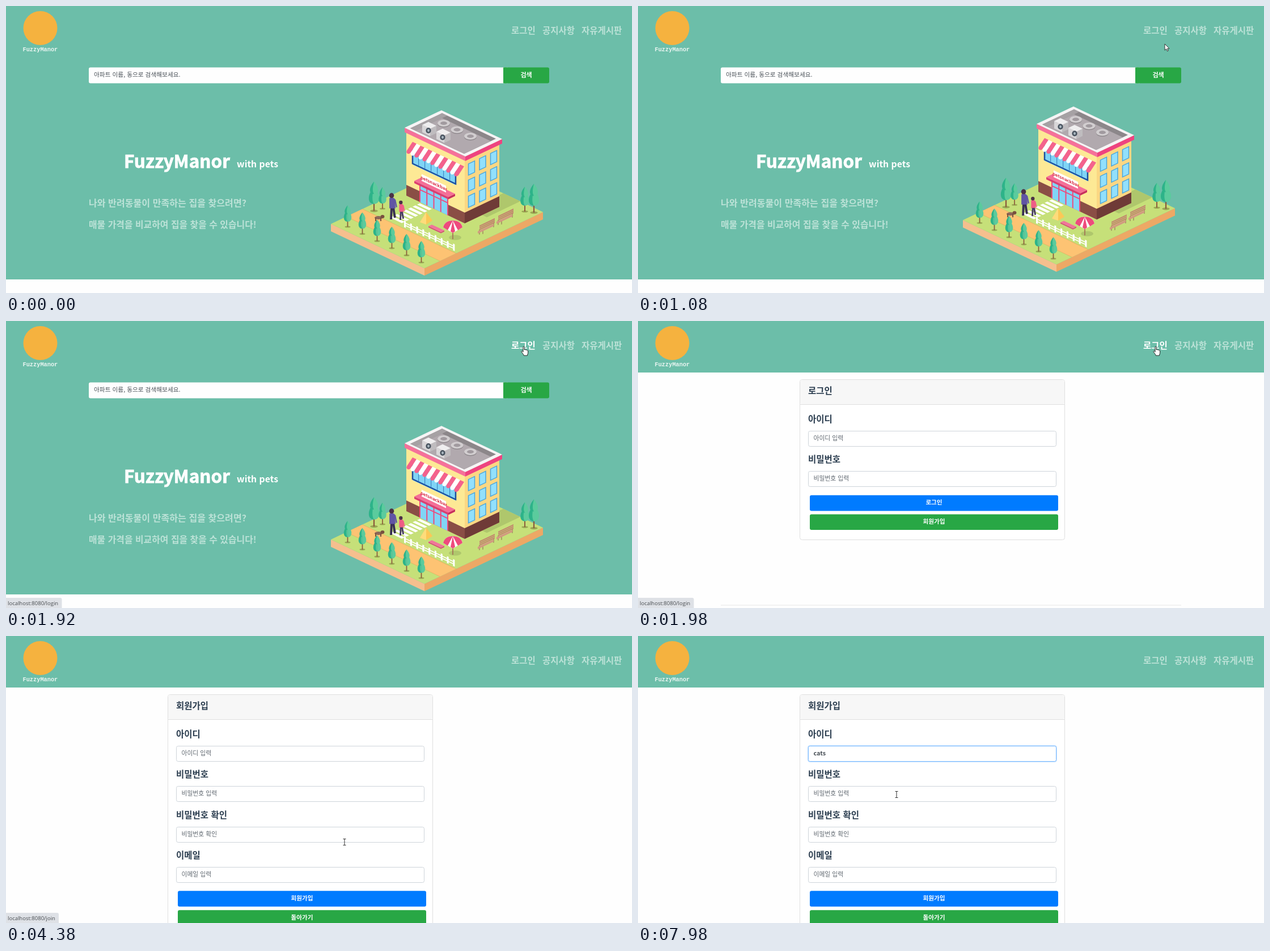
An HTML page for the animation above (8 s loop, 1104 by 507 pixels).

```html
<!DOCTYPE html>
<html lang="ko">
<head>
<meta charset="utf-8">
<title>FuzzyManor</title>
<style>
html, body { margin: 0; width: 100%; height: 100%; overflow: hidden; background: #fefefe; }
svg { display: block; width: 1104px; height: 507px; }
text { font-family: "Noto Sans CJK KR", "Noto Sans CJK", sans-serif; white-space: pre; }
.mono { font-family: "Liberation Mono", monospace; }
.ui { font-family: "Open Sans", sans-serif; }
</style>
</head>
<body>
<svg id="stage" viewBox="0 0 1104 507"></svg>
<script>
const LOOP = 8000, STEP = 60;
const GREEN = '#28a745', BLUE = '#007bff', TEAL = '#6cbea9', SOFT = '#bce2d7', INK = '#2c3e50';
const each = (n, fn) => [...Array(n).keys()].map(fn).join('');

const poly = (points, fill) => `<polygon points="${points.join(' ')}" fill="${fill}"/>`;
const box = (x, y, w, h, fill, extra = '') =>
  `<rect x="${x}" y="${y}" width="${w}" height="${h}" fill="${fill}" ${extra}/>`;
const oval = (x, y, rx, ry, fill, extra = '') =>
  `<ellipse cx="${x}" cy="${y}" rx="${rx}" ry="${ry}" fill="${fill}" ${extra}/>`;
const shape = (d, fill) => `<path d="${d}" fill="${fill}"/>`;
const path = (d, stroke, width, extra = '') =>
  `<path d="${d}" fill="none" stroke="${stroke}" stroke-width="${width}" ${extra}/>`;
const group = (move, body) => `<g transform="${move}">${body}</g>`;
// y is the vertical middle of the line
const label = (x, y, size, str, fill, extra = '') =>
  `<text x="${x}" y="${y + size * 0.37}" font-size="${size}" fill="${fill}" ${extra}>${str}</text>`;
const BOLD = 'font-weight="700"', MID = 'font-weight="500"';
const CENTER = 'text-anchor="middle" font-weight="700"';

/* ---------- isometric drawing ---------- */

const TILT = 25.4, SLOPE = Math.tan(TILT * Math.PI / 180);
// walls facing down-left and down-right
const left = (x, y, body) => group(`translate(${x} ${y}) skewY(${TILT})`, body);
const right = (x, y, body) => group(`translate(${x} ${y}) skewY(${-TILT})`, body);

// flat rectangle: a runs down-right, b runs up-right from the left corner
const floor = (x, y) => (a1, a2, b1, b2, fill) =>
  poly([[a1, b1], [a2, b1], [a2, b2], [a1, b2]].map(([a, b]) => [x + a + b, y + SLOPE * (a - b)]), fill);

const block = (x, y, w, d, h, [l, r, top]) =>
  left(x, y, box(0, 0, w, h, l)) +
  right(x + w, y + w * SLOPE, box(0, 0, d, h, r)) +
  (top ? floor(x, y)(0, w, 0, d, top) : '');

function tree(x, y, s) {
  const leaf = (top, low, w) => {
    const half = side => `M0 ${top}C${side * w} ${top + 8} ${side * w} ${low} 0 ${low}`;
    return shape(half(-1), '#2db389') + shape(half(1), '#5bcb9d') +
      shape(`M0 ${top}C${-w * .3} ${top + 9} ${-w * .3} ${low - 3} 0 ${low}`, '#5bcb9d');
  };
  return group(`translate(${x} ${y}) scale(${s})`,
    oval(0, 0, 5, 1.6, '#9aa653') + path('M0 0V-24', '#8b5a3c', 1.7) + leaf(-30, -9, 9) + leaf(-38, -22, 7));
}

const bench = (x, y) => right(x, y,
  path('M-12 2V11M-6 6V13M13 2V10', '#8d5f50', 1) +
  each(3, i => box(-12, -5 + i * 3, 27, 2.3, '#c2866d')) + box(-15, 4, 28, 4, '#d29a80'));

function land() {
  const tile = floor(573, 385);
  return block(573, 385, 165, 209, 13, ['#f5bf8e', '#eda865', '#c6e079']) +
    tile(0, 165, 27, 56, '#d7a75c') + tile(0, 165, 27.6, 55.4, '#fdc373') +
    tile(95, 125, 150, 209, '#afc76c') +
    each(7, i => tile(40, 61, 64 + i * 8, 69 + i * 8, '#fff'));
}

function house() {
  const panes = 'stroke="#4ba6dc" stroke-width="1.5"';
  const front = box(11, 30, 76, 28, '#7fd4f6') + path('M11 30V56H87V30', '#1d4f9e', 2.5) +
    each(6, i => box(21 + i * 11, 30, 1.2, 25, '#3f86c4')) +
    box(24, 84, 49, 34, '#80d5f7') +
    each(5, i => box(23 + i * 12.25, 84, 2, 34, '#ee4a7c')) + box(24, 95, 49, 2, '#ee4a7c');
  const side = each(9, i => box(6.5 + i % 3 * 19.5, 16 + Math.floor(i / 3) * 28.5, 11, 20, '#92e0fc', panes));
  return block(706, 217, 103, 61, 118, ['#fde995', '#fbd783']) +
    block(706, 316, 103, 61, 19, ['#8a4e45', '#6f3b37']) +
    left(706, 217, front) + right(809, 266, side);
}

function awning() {
  return group(`matrix(1 ${SLOPE} -.65 1 717 240)`, each(13, i => {
    const fill = i % 2 ? '#fff' : '#f4628d';
    return box(i * 7, 0, 7, 15, fill) + oval(i * 7 + 3.5, 15, 3.5, 4, fill);
  }));
}

const entrance = () => block(720, 309, 60, 12, 4, ['#dc3f70', '#c72f5f', '#f56f97']) +
  left(733, 297, box(0, 0, 43, 12, '#fff') + label(21.5, 6, 7.6, 'petsnackbar', '#d8273f', CENTER));

function roof() {
  const top = floor(703, 215);
  const vent = i => group(`translate(${772 + i * 23.5} ${207 + i * 11.5})`,
    oval(0, 1.5, 11, 6, '#8f898d') + oval(0, 0, 11, 6, '#d2ced0') + oval(0, 0, 6, 3, '#a19a9f'));
  const cooler = i => group(`translate(${734 + i * 25} ${210 + i * 12})`,
    block(0, 0, 14, 11, 13, ['#d8d6d8', '#bfbcbf', '#efeeef']) +
    oval(11, 10, 4.6, 5, '#4a5561') + oval(11, 10, 2, 2.4, '#a9b6bf'));
  return block(703, 215, 107, 65, 8, ['#f5719a', '#ee4380', '#f6f4f5']) +
    top(6, 101, 4, 60, '#8c878a') + top(6, 15, 4, 60, '#a6a1a4') + top(15, 101, 4, 51, '#b1a9ae') +
    each(3, vent) + each(2, cooler);
}

function person(x, y, s, shirt, legs) {
  return group(`translate(${x} ${y}) scale(${s})`,
    path('M-1-22L-2 0M2-22L5-3', legs, 4) + shape('M-5-38Q0-42 5-37L6-20H-5Z', shirt) +
    path('M5-36L8-22', shirt, 2.4) + oval(-1, -43, 4.4, 4.6, '#4b3146'));
}

function garden() {
  const fence = path('M0 4H88M0 8H88', '#fff', 1.8) + each(9, i => box(i * 10.8 - 1, 0, 3, 12, '#fff'));
  const dog = oval(657, 374, 7, 3, '#8d6658') + oval(664, 372, 3.4, 3, '#78503f') +
    path('M652 374V380M661 374V380', '#78503f', 2);
  const tent = poly([[730, 382], [741, 364], [752, 379], [741, 386]], '#fbc857') +
    poly([[730, 382], [741, 364], [741, 386]], '#fddc7b');
  const parasol = oval(792, 409, 11, 4.5, '#afc76c') + path('M788 390V412', '#a26b52', 1.6) +
    shape('M771 391Q774 379 788 379Q802 379 805 391L788 401Z', '#fff') +
    shape('M788 379Q774 379 771 391L779 396ZM788 379Q802 379 805 391L797 396ZM788 379L784 398L788 401L792 398Z', '#ee4b7d');
  return left(703, 379, fence) + person(681, 377, .98, '#6054a4', '#382f52') +
    person(697, 378, .72, '#ef5c86', '#463b61') + dog + tent +
    block(745, 389, 22, 6, 2, ['#d14c74', '#d14c74', '#f0759a']) + parasol + bench(847, 387) + bench(880, 370);
}

const scene = () => land() + tree(649, 362, 1.36) + tree(664, 358, 1) +
  house() + awning() + entrance() + roof() + garden() +
  tree(915, 363, 1.15) + tree(931, 365, 1.34) +
  each(6, i => tree(602.5 + i * 26, 390 + i * 12.6, 1));

/* ---------- pages ---------- */

function home() {
  return box(0, 0, 1104, 483, TEAL) +
    box(146, 108.5, 740, 28, '#fefefe', 'rx="3"') +
    label(155, 121.5, 10.7, '아파트 이름, 동으로 검색해보세요.', '#495057', MID) +
    box(877, 108.5, 81, 28, GREEN, 'rx="3"') + box(877, 108.5, 6, 28, GREEN) +
    label(917.5, 121.5, 11, '검색', '#fff', CENTER) +
    label(208, 274, 31.5, 'FuzzyManor', '#fff', `${BOLD} stroke="#fff" stroke-width=".8"`) +
    label(407, 279.5, 15.8, 'with pets', '#fff', BOLD) +
    label(146, 348, 16.1, '나와 반려동물이 만족하는 집을 찾으려면?', SOFT, BOLD) +
    label(146, 386.5, 15.9, '매물 가격을 비교하여 집을 찾을 수 있습니다!', SOFT, BOLD) +
    `<g id="scene">${scene()}</g>`;
}

const fieldTop = i => 194 + i * 71.4;
const field = (title, i) => {
  const y = Math.round(fieldTop(i)), hint = title.includes('확인') ? title : title + ' 입력';
  return label(300, y - 20.5, 15.5, title, INK, BOLD) +
    box(300.5, y + .5, 437, 27, '#fff', `rx="3" stroke="#ced4da" id="field${i}"`) +
    label(309.5, y + 13, 10.8, hint, '#5f676f', `${MID} class="hint"`);
};

const button = (y, str, fill, id = '') => box(303, y, 438, 27.7, fill, `rx="3" ${id}`) +
  label(522, y + 12.5, 10.6, str, '#fff', CENTER);

const card = (title, h, body) => box(0, 0, 1104, 91, TEAL) +
  box(285.5, 103.5, 467, h, '#fff', 'rx="4" stroke="#dfdfdf"') +
  box(286, 104, 466, 43, '#f7f7f7', 'rx="3"') + path('M286 147.5H752', '#dfdfdf', 1) +
  label(300, 123.5, 15.5, title, INK, BOLD) + body;

const login = () => path('M146 502H958', '#e6e6e6', 1) +
  card('로그인', 283, ['아이디', '비밀번호'].map(field).join('') +
    button(307.8, '로그인', BLUE) + button(341.4, '회원가입', GREEN, 'id="signup"'));

const join = () => card('회원가입', 460,
  box(299, 193, 440, 30, '#bfdeff', 'rx="4.5" id="glow"') +
  ['아이디', '비밀번호', '비밀번호 확인', '이메일'].map(field).join('') +
  label(309.5, 207, 10.8, '', '#495057', `${BOLD} id="typed"`) +
  box(309, 202, 1, 12, '#333', 'id="caret"') +
  button(450.3, '회원가입', BLUE) + button(484.2, '돌아가기', GREEN));

const header = () => '<circle cx="60.5" cy="39" r="30" fill="#f5b23f"/>' +
  label(29.5, 75.7, 10.3, 'FuzzyManor', '#e9f5f1', `${BOLD} class="mono"`) +
  label(891, 43.5, 15.5, '로그인', SOFT, `${BOLD} id="nav"`) +
  label(946, 43.5, 15.5, '공지사항', SOFT, BOLD) + label(1015, 43.5, 15.5, '자유게시판', SOFT, BOLD);

const status = () => '<g id="status"><rect id="bar" x="-4" y="489" height="24" rx="3" fill="#dee1e6"/>' +
  label(3, 498.5, 9.5, '', '#484c50', 'class="ui" id="url"') + '</g>';

const HAND = 'M-1 1.2C-1-.4 1.2-.4 1.2 1.2V6C1.4 4.9 3.2 5 3.4 6.3C3.8 5.3 5.4 5.6 5.6 6.9C6.2 6.2 7.6 6.6 7.6 8V11.5L6.4 16H.2C0 14-2.6 11.6-3.8 9.6C-4.5 8.3-2.8 7.4-1.8 8.6L-1 9.6Z';
const cursors = () => '<g id="cursor">' +
  '<path id="arrow" d="M0 0V11.2L2.6 8.8L4.4 12.8L6.2 12L4.5 8.2H8Z" fill="#fff" stroke="#222" stroke-width=".9"/>' +
  `<path id="hand" d="${HAND}" fill="#fff" stroke="#222"/>` +
  path('M-2.5-5.5H2.5M0-5.5V5.5M-2.5 5.5H2.5', '#333', 1, 'id="beam"') + '</g>';

document.getElementById('stage').innerHTML =
  `<g id="home">${home()}</g><g id="login">${login()}</g><g id="join">${join()}</g>` +
  header() + status() + cursors();

/* ---------- motion ---------- */

const $ = q => document.querySelector(q);
const show = (q, on) => $(q).setAttribute('visibility', on ? 'inherit' : 'hidden');
const set = (q, name, value) => $(q).setAttribute(name, value);
const part = (t, a, b) => Math.min(1, Math.max(0, (t - a) / (b - a)));

// pointer moves: start, end, where to, sideways bend
const MOVES = [
  { from: 360, to: 1080, x: 929, y: 67, bend: 0 },
  { from: 1140, to: 1500, x: 913, y: 45, bend: 0 },
  { from: 2400, to: 3060, x: 726, y: 364, bend: 30 },
  { from: 3240, to: 3750, x: 597, y: 364, bend: 22 },
  { from: 4620, to: 5580, x: 471, y: 217, bend: 10 },
  { from: 7200, to: 7740, x: 456, y: 288, bend: 0 },
  { from: 7800, to: 7980, x: 456, y: 280, bend: 0 }
];

function pointer(t) {
  let x = 1130, y = 58;
  for (const m of MOVES) {
    const p = part(t, m.from, m.to);
    const k = (1 - Math.cos(Math.PI * p)) / 2;
    const dx = m.x - x, dy = m.y - y, side = m.bend * Math.sin(Math.PI * k) / Math.hypot(dx, dy);
    x += dx * k + dy * side;
    y += dy * k - dx * side;
    if (p < 1) break;
  }
  return [x, y];
}

const pageAt = t => t < 1980 ? 'home' : t < 4200 ? 'login' : 'join';

function hit(page, [x, y]) {
  const within = (l, r, top, h) => x >= l && x <= r && y >= top && y <= top + h;
  if (within(891, 934, 34, 20)) return 'nav';
  if (page === 'login' && within(303, 741, 341, 28)) return 'signup';
  const count = { home: 0, login: 2, join: 4 }[page];
  return [...Array(count).keys()].some(i => within(300, 738, fieldTop(i), 28)) ? 'field' : '';
}

function render(now) {
  const t = Math.floor(now % LOOP / STEP) * STEP;
  const page = pageAt(t), pos = pointer(t), over = hit(page, pos);

  for (const p of ['home', 'login', 'join']) show('#' + p, p === page);
  const bob = 1 - 8 * Math.cos(Math.PI * (t - 920) / 2000);
  set('#scene', 'transform', `translate(0 ${bob})`);

  set('#cursor', 'transform', `translate(${pos.map(Math.round)})`);
  const kind = over === 'field' ? 'beam' : over ? 'hand' : 'arrow';
  for (const c of ['arrow', 'hand', 'beam']) show('#' + c, c === kind);
  set('#nav', 'fill', over === 'nav' ? '#fff' : SOFT);
  set('#signup', 'fill', hit(page, pointer(t - 150)) === 'signup' ? '#218838' : GREEN);

  const link = t >= 1620 && t < 2520 ? 'login' : t >= 3960 && t < 4800 ? 'join' : '';
  show('#status', link);
  $('#url').textContent = 'localhost:8080/' + link;
  set('#bar', 'width', link === 'login' ? 102.5 : 97);

  const focus = part(t, 5700, 5850);
  set('#glow', 'opacity', focus);
  set('#join #field0', 'stroke', focus ? '#80bdff' : '#ced4da');
  const typed = t < 6600 ? 0 : t < 7020 ? 1 + (t >= 6720) : 3 + (t >= 7140);
  $('#typed').textContent = 'cats'.slice(0, typed);
  show('#join .hint', !typed);
  show('#caret', t >= 5760 && t < 6300);
}

const start = performance.now();
function tick() {
  render(performance.now() - start);
  requestAnimationFrame(tick);
}
tick();
</script>
</body>
</html>
```
